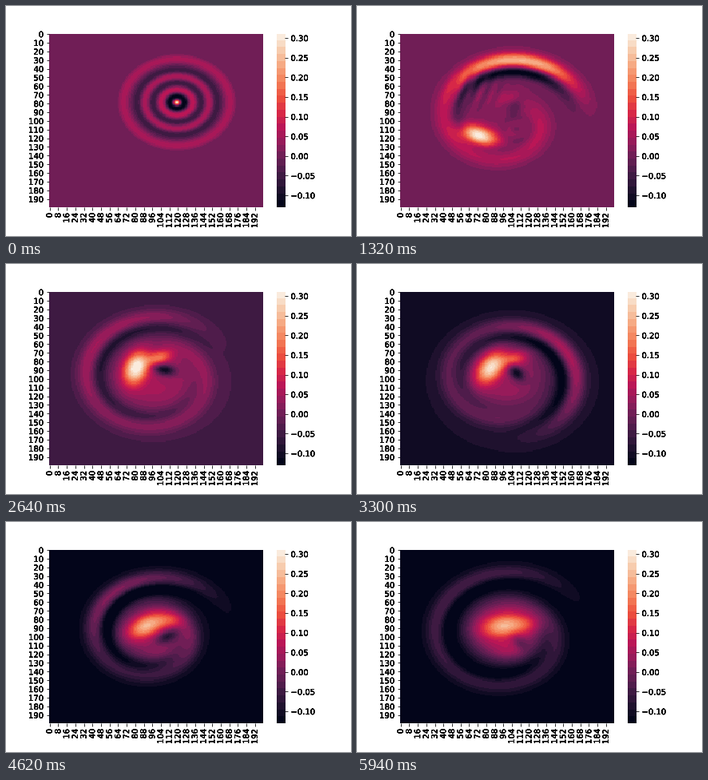
These frames come from a looping animation (432x288 px, 6.27 s). A matplotlib script:

```python
import numpy as np
import matplotlib.pyplot as plt
from matplotlib import patheffects
from matplotlib.animation import FuncAnimation
from matplotlib.colors import LinearSegmentedColormap, ListedColormap

W, H, DPI = 432, 288, 72
FRAMES, INTERVAL = 19, 330
CELLS, BANDS = 200, 25
VMIN, VMAX = -0.1304, 0.3111

STOPS = ["#03051a", "#221331", "#451c47", "#691f55", "#921c5b", "#b91657",
         "#d92847", "#ed503e", "#f47d57", "#f6a47c", "#f7c9aa", "#faebdd"]
smooth = LinearSegmentedColormap.from_list("ember", STOPS)
cmap = ListedColormap(smooth(np.linspace(0, 1, BANDS)))

# Colour band of the calm surface; it stays at the lowest band afterwards
CALM = [7, 10, 10, 10, 7, 5, 5, 5, 4, 3, 1, 0]

# Key points of the turning arm: tip angle, inward pitch, extra brightness
KEYS = [0, 3, 6, 8, 11, 14, 18]
TIP = [340, 109, -189, -321, -496, -696, -1048]
PITCH = [.15, .15, .09, .08, .07, .12, .095]
PEAK = [.30, .50, .25, .08, .22, .18, .05]

X, Y = np.meshgrid(np.arange(CELLS) + .5, np.arange(CELLS) + .5)
CX, CY = 98, 100
RADIUS = np.hypot(X - CX, Y - CY)
ANGLE = np.degrees(np.arctan2(CY - Y, X - CX))


def ease(x, start, end):
    t = np.clip((x - start) / (end - start), 0, 1)
    return t * t * (3 - 2 * t)


def gauss(x, spread):
    return np.exp(-.5 * (x / spread) ** 2)


def plateau(x, y, radius, height):
    return height * np.exp(-(np.hypot(X - x, Y - y) / radius) ** 4)


def bump(x, y, su, sv, tilt, height):
    c, s = np.cos(np.radians(tilt)), np.sin(np.radians(tilt))
    dx, up = X - x, y - Y
    return height * gauss(dx * c + up * s, su) * gauss(up * c - dx * s, sv)


def rings(scale=1.0, grow=0):
    """Round waves whose last crest is the widest."""
    r = np.hypot(X - 119.5, Y - 79.5)
    turns = np.interp(r - grow, [0, 37.5, 56], [0, 2.5, 3.25])
    height = .12 + .58 * np.exp(-r / 6)
    return scale * height * np.cos(2 * np.pi * turns)


def arm(n, settled):
    """Spiral crest with a dark trough on its inner side."""
    tip, pitch, peak = (np.interp(n, KEYS, v) for v in (TIP, PITCH, PEAK))
    reach = 75.5 + 3.5 * np.cos(2 * np.pi * (n - 4) / 14)
    brightest = 55 + 50 * settled
    crest, trough = np.zeros_like(X), np.zeros_like(X)
    for turn in (0, 360):
        s = (ANGLE - tip + 30) % 360 - 30 + turn
        offset = RADIUS - (reach - pitch * s)
        height = .13 + peak * gauss(s - brightest, 42)
        height *= ease(s, -20, 55) * (1 - ease(s, 330, 440))
        dip = .65 * height * (1 - ease(s, 200, 340))
        crest = np.maximum(crest, height * gauss(offset, 6.3))
        trough = np.maximum(trough, dip * gauss(offset + 13, 4.5))
    return crest - trough


def ripples():
    """Early interference streaks and the small rings in the middle."""
    streaks = bump(70, 66, 16, 13, 0, .12) * np.cos(
        2 * np.pi * (X - 60 + .35 * (Y - 80)) / 11)
    r = np.hypot(X - 109, Y - 110)
    return streaks - .08 * np.cos(2 * np.pi * r / 14) * np.exp(-r / 13)


def core(n, settled, p):
    """Hot spot that swings round and widens, with its dark companion."""
    early = 1 - settled
    z = bump(78 + 19 * p - 7 * early, 88 + 40 * early,
             7.5 + 1.5 * p, 13 + 1.5 * p, 90 * early - 80 * p,
             (.68 - .23 * p) * min(n / 3, 1))
    z += settled * plateau(98, 99 - 7 * p, 42 - 4 * p, .14 + .24 * p)
    z += settled * bump(100 + 20 * p, 74 + 12 * p, 9, 5 + 2 * p,
                        30 * (1 - p), .36 - .24 * p)
    z -= settled * bump(107 + 5 * p, 87 + 20 * p, 7.5, 4.5,
                        30 - 22 * (n - 6), .40 - .26 * p)
    return z + bump(103, 117, 14, 7, 0, .08 * p)


def field(n):
    level = (CALM[min(n, len(CALM) - 1)] + .5) / BANDS
    if n == 0:
        return level + rings()
    settled = ease(n, 3, 6)
    p = np.clip((n - 6) / 12, 0, 1)
    z = level + arm(n, settled) + core(n, settled, p)
    z += (1 - ease(n, 3, 5)) * ripples()
    z += plateau(105, 104, 74, .08 * gauss(n - 10, 1.6))
    if n < 3:
        z += rings(.5 / n, 8 * n)
    return np.clip(z, 0, 1)


fig = plt.figure(figsize=(W / DPI, H / DPI), dpi=DPI, facecolor="white")
ax = fig.add_axes([.125, .125, .62, .755])
cax = fig.add_axes([338.58 / W, .125, 10.87 / W, .755])

image = ax.imshow(field(0), cmap=cmap, vmin=0, vmax=1, aspect="auto",
                  interpolation="nearest", extent=(0, CELLS, CELLS, 0))
xs, ys = np.arange(0, CELLS, 8), np.arange(0, CELLS, 10)
ax.set_xticks(xs + .5, [str(v) for v in xs], rotation=90)
ax.set_yticks(ys + .5, [str(v) for v in ys])

cax.imshow(np.linspace(0, 1, BANDS)[:, None], cmap=cmap, vmin=0, vmax=1,
           aspect="auto", origin="lower", interpolation="nearest",
           extent=(0, 1, VMIN, VMAX))
ticks = np.arange(-2, 7) * .05
cax.set_xticks([])
cax.set_yticks(ticks, [f"{v:.2f}".replace("-", "\u2212") for v in ticks])
cax.yaxis.tick_right()

# Repeated drawing gives the labels their hard, heavy edges
heavy = [patheffects.Normal()] * 6
for a in (ax, cax):
    a.spines[:].set_visible(False)
    for label in a.get_xticklabels() + a.get_yticklabels():
        label.set(family="DejaVu Sans", size=10, path_effects=heavy)


def draw(n):
    image.set_data(field(n))
    return [image]


anim = FuncAnimation(fig, draw, frames=FRAMES, interval=INTERVAL,
                     repeat=True, repeat_delay=0, blit=False)
plt.show()
```
